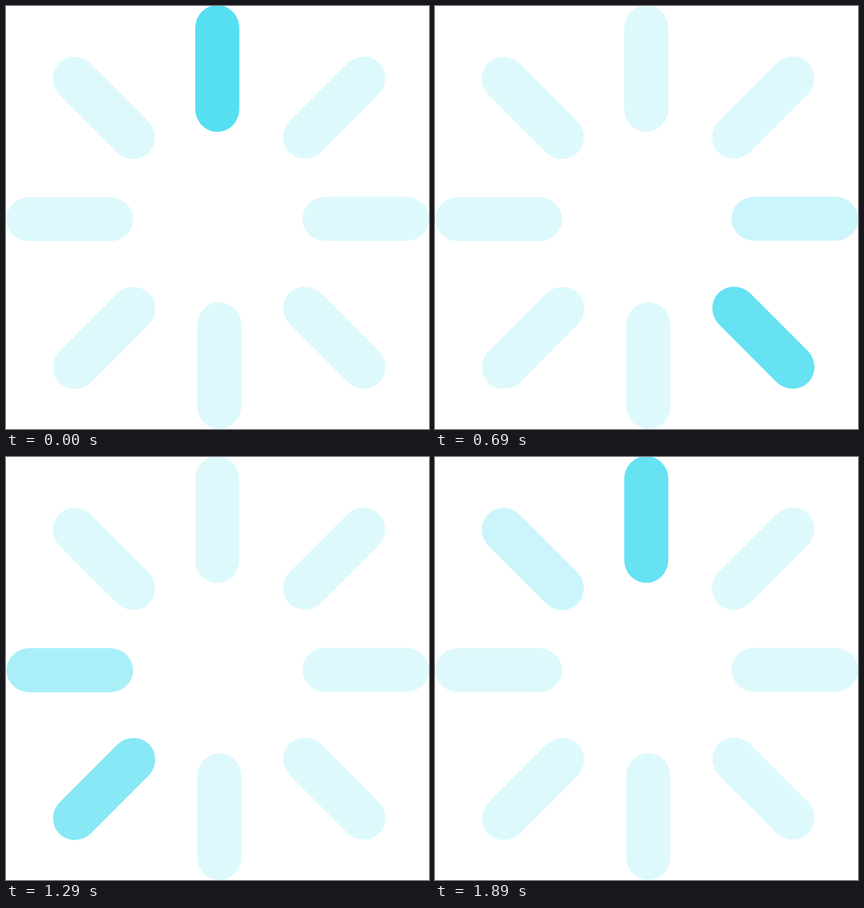
These frames come from a looping animation (748x748 px, 1920 ms). An HTML page:

```html
<!DOCTYPE html>
<html lang="en">
<head>
<meta charset="utf-8">
<title>Spinner</title>
<style>
  html, body { margin: 0; height: 100%; overflow: hidden; background: #fff; }
  svg { display: block; width: 100%; height: 100%; }
</style>
</head>
<body>
<svg viewBox="0 0 748 748" fill="#56dff1"></svg>
<script>
  const LOOP = 1920, TICK = 30, DIM = 0.2;
  const LENGTH = 224, WIDTH = 78;

  // Bar centres, clockwise from the top
  const centres = [
    [373.6, 110.5], [580.3, 179.8], [636.2, 376.3], [580.7, 586.5],
    [377.2, 636], [173.5, 587], [112.8, 377], [173, 180.3]
  ];

  const svg = document.querySelector('svg');
  const bars = centres.map(([x, y], i) => {
    const bar = document.createElementNS(svg.namespaceURI, 'rect');
    const attrs = {
      x: -WIDTH / 2, y: -LENGTH / 2, width: WIDTH, height: LENGTH,
      rx: WIDTH / 2, ry: 40.5,
      transform: `translate(${x} ${y}) rotate(${i * 45})`
    };
    for (const name in attrs) bar.setAttribute(name, attrs[name]);
    return svg.appendChild(bar);
  });

  // Each bar fades linearly in and out around its turn
  function draw(now) {
    const time = Math.floor(now / TICK) * TICK % LOOP;
    const turn = time / LOOP * bars.length;
    bars.forEach((bar, i) => {
      const gap = Math.abs(turn - i);
      const glow = Math.max(0, 1 - Math.min(gap, bars.length - gap));
      bar.setAttribute('opacity', DIM + (1 - DIM) * glow);
    });
  }

  const start = performance.now();
  function loop() {
    draw(performance.now() - start);
    requestAnimationFrame(loop);
  }
  loop();
</script>
</body>
</html>
```
